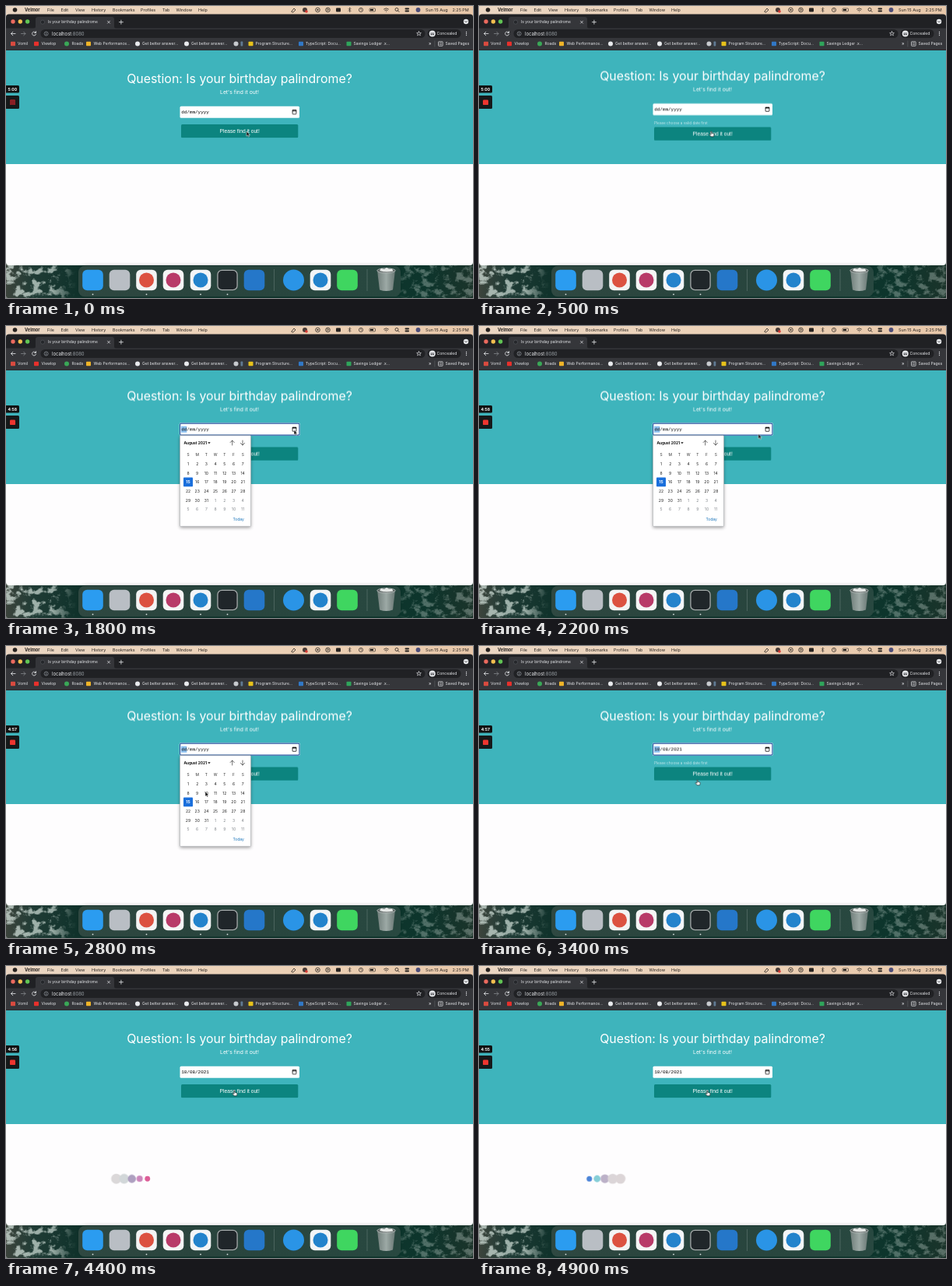
An HTML page that plays this animation: 600 by 375 pixels, repeating every 5000 ms.

```html
<!DOCTYPE html>
<html lang="en">
<head>
<meta charset="utf-8">
<title>Is your birthday palindrome</title>
<style>
html, body { margin: 0; width: 100%; height: 100%; overflow: hidden; background: #123a37; }
svg { display: block; width: 100vw; height: 100vh; }
text { font-family: Inter, sans-serif; white-space: pre; }
.mono { font-family: "Liberation Mono", monospace; font-size: 5.95px; }
.arial { font-family: "Liberation Sans", Arial, sans-serif; }
.b { font-weight: 700; }
.mid { text-anchor: middle; }

.step { animation: 5s step-end infinite; }
.head { animation-name: head; }
.button { animation-name: button; }
.error { animation-name: error; }
.picker { animation-name: picker; }
.focus { animation-name: focus; }
.empty { animation-name: empty; }
.filled { animation-name: filled; }
.loader { animation-name: loader; }
.clock { animation-name: clock; }
.dim { animation-name: dim; }
.arrow { animation-name: arrow; }
.hand { animation-name: hand; }
.cursor { animation: move 5s linear infinite; }
.dot { fill: var(--c); transform-box: fill-box; transform-origin: center; animation: pulse 5s ease-in-out infinite; }

@keyframes head { 0%, 75% { transform: translateY(3.5px); } 6% { transform: none; } }
@keyframes button { 0%, 75% { transform: translateY(-3.5px); } 6% { transform: none; } }
@keyframes error { 0%, 75% { opacity: 0; } 6% { opacity: 1; } }
@keyframes picker { 0%, 58% { opacity: 0; } 30% { opacity: 1; } }
@keyframes focus { 0%, 75% { opacity: 0; } 30% { opacity: 1; } }
@keyframes empty { 0% { opacity: 1; } 58% { opacity: 0; } }
@keyframes filled { 0% { opacity: 0; } 58% { opacity: 1; } }
@keyframes loader { 0% { opacity: 0; } 75% { opacity: 1; } }
@keyframes dim { 0% { opacity: 1; } 2% { opacity: 0; } }
@keyframes arrow { 0%, 14% { opacity: 1; } 2%, 67% { opacity: 0; } }
@keyframes hand { 0%, 14% { opacity: 0; } 2%, 67% { opacity: 1; } }
@keyframes clock {
  0% { transform: none; }
  14% { transform: translateY(-12px); }
  34% { transform: translateY(-24px); }
  54% { transform: translateY(-36px); }
  74% { transform: translateY(-48px); }
  94% { transform: translateY(-60px); }
}
@keyframes move {
  0%, 2% { transform: translate(309px, 161px); }
  8%, 12% { transform: translate(298.5px, 161px); }
  17% { transform: translate(326px, 150px); }
  24%, 38% { transform: translate(370px, 133.5px); }
  44% { transform: translate(359px, 138.5px); }
  54%, 59% { transform: translate(256px, 187px); }
  63% { transform: translate(268px, 180px); }
  68% { transform: translate(280.5px, 172px); }
  72%, 100% { transform: translate(293.5px, 160px); }
}
@keyframes pulse {
  0%, 75%, 100% { transform: scale(1); fill: var(--c); }
  87.5% { transform: scale(1.95); fill: #dcd8d9; }
}
</style>
</head>
<body>
<svg id="stage" viewBox="0 0 600 375" preserveAspectRatio="none"></svg>
<script>
const rect = (x, y, w, h, fill, r = 0, extra = '') =>
  `<rect x="${x}" y="${y}" width="${w}" height="${h}" rx="${r}" fill="${fill}" ${extra}/>`;
const circle = (x, y, r, fill, extra = '') =>
  `<circle cx="${x}" cy="${y}" r="${r}" fill="${fill}" ${extra}/>`;
const line = (d, color, w = 0.8) =>
  `<path d="${d}" fill="none" stroke="${color}" stroke-width="${w}" stroke-linecap="round" stroke-linejoin="round"/>`;
// y is the middle of the capitals
const text = (x, y, str, size, fill, cls = '') =>
  `<text x="${x}" y="${y + size * 0.36}" font-size="${size}" fill="${fill}" class="${cls}">${str}</text>`;
const group = (cls, ...parts) => `<g class="${cls}">${parts.join('')}</g>`;

const defs = `<defs>
  <linearGradient id="sky"><stop offset="0" stop-color="#ead6c3"/><stop offset=".5" stop-color="#ecd2b8"/>
    <stop offset="1" stop-color="#e8c8aa"/></linearGradient>
  <linearGradient id="sea"><stop offset="0" stop-color="#3c443c"/><stop offset=".06" stop-color="#1f3b35"/>
    <stop offset=".15" stop-color="#10322b"/><stop offset=".9" stop-color="#0d352c"/><stop offset="1" stop-color="#1b332a"/></linearGradient>
  <linearGradient id="shelf"><stop offset="0" stop-color="#2f4841"/><stop offset=".4" stop-color="#29443d"/>
    <stop offset="1" stop-color="#284840"/></linearGradient>
  <linearGradient id="fade"><stop offset="0" stop-color="#bbb"/><stop offset=".1" stop-color="#aaa"/>
    <stop offset=".15" stop-color="#000"/><stop offset=".82" stop-color="#000"/><stop offset=".87" stop-color="#555"/>
    <stop offset="1" stop-color="#555"/></linearGradient>
  <linearGradient id="can"><stop offset="0" stop-color="#89918f"/><stop offset=".5" stop-color="#c3c9c7"/>
    <stop offset="1" stop-color="#7f8886"/></linearGradient>
  <mask id="shore"><rect y="330" width="600" height="45" fill="url(#fade)"/></mask>
  <filter id="foam" x="0" y="0" width="1" height="1">
    <feTurbulence type="fractalNoise" baseFrequency=".09 .11" numOctaves="5" seed="8"/>
    <feColorMatrix values="0 0 0 0 .68  0 0 0 0 .78  0 0 0 0 .73  6 0 0 0 -3"/>
  </filter>
  <filter id="soft" x="-.2" y="-.2" width="1.4" height="1.4"><feGaussianBlur stdDeviation="2"/></filter>
  <clipPath id="face"><rect y="102" width="17" height="9.5"/></clipPath>
</defs>`;

function desktop() {
  return rect(0, 0, 600, 375, 'url(#sea)') +
    `<g mask="url(#shore)">${rect(0, 330, 600, 45, '#fff', 0, 'filter="url(#foam)"')}</g>` +
    rect(0, 0, 600, 14, 'url(#sky)');
}

function menuBar() {
  const ink = '#27221f';
  const items = [[53, 'File'], [70.5, 'Edit'], [89, 'View'], [110, 'History'], [137, 'Bookmarks'],
    [173, 'Profiles'], [201, 'Tab'], [218.5, 'Window'], [247, 'Help']];
  return circle(11.5, 5, 2.8, ink) + text(24, 5, 'Velmor', 5.6, ink, 'b') +
    items.map(([x, s]) => text(x, 5, s, 5.4, ink)).join('') +
    line('M367 7l3-4 2 2-3 3z', ink) +
    circle(384, 5, 3, '#493c38') + circle(386, 7, 1.8, '#d93b35') +
    circle(400.5, 5, 2.8, 'none', `stroke="${ink}" stroke-width=".8"`) + circle(400.5, 5, 1.1, ink) +
    circle(413.5, 5, 2.8, 'none', `stroke="${ink}" stroke-width=".8"`) + line('M412.8 3.8v2.4l2-1.2z', ink, .6) +
    rect(424, 2.5, 6, 5, ink, 1) +
    line('M440 3.4l3 3-1.5 1.5v-6l1.5 1.5-3 3', ink, .6) +
    circle(456, 5, 2.6, 'none', `stroke="${ink}" stroke-width=".7"`) + line('M456 3.5V5l1 .7', ink, .6) +
    rect(467, 3, 7.5, 4, 'none', 1, `stroke="${ink}" stroke-width=".6"`) + rect(468, 4, 4, 2, ink) +
    line('M485.5 4q3-2.5 6 0M486.8 5.6q1.7-1.4 3.4 0M488.5 7.2h.1', ink, .8) +
    circle(502, 4.5, 2, 'none', `stroke="${ink}" stroke-width=".8"`) + line('M503.5 6l1.6 1.6', ink) +
    rect(512.5, 2.5, 5.5, 2, ink, 1) + rect(512.5, 5.5, 5.5, 2, ink, 1) +
    circle(529.5, 5, 2.9, '#4d4d78') +
    text(539, 5, 'Sun 15 Aug', 5.4, ink) + text(573.5, 5, '2:25 PM', 5.4, ink);
}

function browser() {
  const pale = '#e8eaed', grey = '#9aa0a6';
  const lights = ['#ec6a5e', '#f4bf4f', '#61c554'];
  const marks = [
    [9, '#d94a3f', 15, 'Vomil'], [39, '#e8302c', 45.5, 'Viewlop'], [78, '#3aa757', 84.5, 'Roads'],
    [106, '#f0b429', 112.5, 'Web Performance...'], [169, '#e8eaed', 175, 'Get better answer...'],
    [232, '#e8eaed', 238, 'Get better answer...'], [295.5, '#c7cace', 301, ''],
    [314.5, '#e8c21a', 320.5, 'Program Structure...'], [379, '#3178c6', 385, 'TypeScript: Docu...'],
    [440.5, '#2fa55b', 446.5, 'Savings Ledger .x...']];
  const round = new Set([78, 169, 232, 295.5]);
  return `<path d="M0 60V14q0-3.5 4-3.5H596q4 0 4 3.5V60z" fill="#202124"/>` +
    lights.map((c, i) => circle(9 + i * 9.3, 20, 2.7, c)).join('') +
    `<path d="M35 29q3 0 3-3V17q0-3 3-3h95q3 0 3 3v9q0 3 3 3z" fill="#35363a"/>` +
    circle(47, 20.7, 2.6, '#24262a', 'stroke="#5a5d62" stroke-width=".6"') +
    text(54, 20.7, 'Is your birthday palindrome', 4.95, pale) +
    line('M130.5 19.2l3 3m0-3l-3 3', pale, .7) + line('M145.4 20.7h5m-2.5-2.5v5', pale, .8) +
    circle(591, 20, 3.2, pale) + line('M589.5 19.4l1.5 1.5 1.5-1.5', '#35363a', .8) +
    rect(0, 28.5, 600, 28.5, '#35363a') +
    line('M12 35.5H6.5m2.3-2.3l-2.3 2.3 2.3 2.3', pale) + line('M19.5 35.5H25m-2.3-2.3l2.3 2.3-2.3 2.3', '#85888c') +
    line('M38.3 34.3a2.5 2.5 0 1 0 .2 2M38.5 32.6v1.9h-1.9', pale) +
    rect(44.5, 30, 494, 11, '#202124', 5.5) +
    circle(51.6, 35.5, 2.5, 'none', `stroke="${grey}" stroke-width=".7"`) + line('M51.6 35.4v1.3m0-2.6v.1', grey, .7) +
    text(59, 35.5, `localhost<tspan fill="${grey}">:8080</tspan>`, 5.9, pale) +
    line('M530.5 32.6l.9 2h2l-1.6 1.3.6 2-1.9-1.2-1.9 1.2.6-2-1.6-1.3h2z', pale, .6) +
    rect(541.5, 30, 43, 11, '#202124', 5.5) + circle(547.7, 35.5, 4, pale) +
    rect(545.3, 34.6, 4.8, .8, '#35363a') + circle(546.5, 36.6, .9, '#35363a') + circle(548.9, 36.6, .9, '#35363a') +
    text(553.5, 35.5, 'Concealed', 5.1, pale) +
    [33.4, 35.5, 37.6].map(y => circle(591.5, y, .65, pale)).join('') +
    marks.map(([x, c, tx, s]) =>
      (round.has(x) ? circle(x, 48.5, 3, c) : rect(x - 3, 45.7, 6, 5.6, c, .8)) +
      text(tx, 48.5, s, 5, pale)).join('') +
    rect(301.5, 45.5, 2.8, 6, '#617b94', .8) +
    text(543, 48.2, '»', 6, pale) + rect(550.6, 44.5, .6, 8, '#5f6368') +
    rect(555.5, 45.7, 5.6, 5.6, 'none', .7, `stroke="${pale}" stroke-width=".7"`) +
    line('M557 47.5h2.6m-2.6 2h2.6', pale, .6) + text(564.5, 48.5, 'Saved Pages', 5, pale) +
    rect(0, 56.3, 600, .7, '#26272a') +
    '<path d="M0 200H600V329q0 4-4 4H4q-4 0-4-4z" fill="#fefdfe"/>' +
    rect(0, 57, 600, 146, '#3eb4bc');
}

function page() {
  const colors = ['#4480d8', '#5ac9d6', '#67489a', '#c871b4', '#dd5c96'];
  const field = rect(223.5, 125.2, 153.5, 15, '#fff', 1.5) +
    group('step focus',
      rect(222.8, 124.3, 154.9, 16.6, '#fff', 2) +
      rect(223.6, 125.1, 153.3, 15, '#fff', 1.3, 'stroke="#1b4f9c" stroke-width="1.1"') +
      rect(225, 128.6, 7.3, 8.2, '#8fc3f2')) +
    group('step empty', text(225.2, 132.6, 'dd/mm/yyyy', 5.95, '#000', 'mono')) +
    group('step filled', text(225.2, 132.6, '10/08/2021', 5.95, '#000', 'mono')) +
    rect(368.1, 130.4, 4.8, 4.9, 'none', .5, 'stroke="#111" stroke-width=".8"') +
    rect(367.8, 129.7, 5.4, 1.9, '#111', .3);
  return group('step head',
      text(300, 90.2, 'Question: Is your birthday palindrome?', 15.9, '#fff', 'mid'),
      text(300, 106.8, "Let's find it out!", 6.8, '#fff', 'mid'), field) +
    group('step error', `<g font-weight="300">${text(225, 150, 'Please choose a valid date first', 4.78, '#e0f3f4')}</g>`) +
    group('step button', rect(225, 155.4, 150.3, 17.4, '#0c847f', 1.5),
      text(300.2, 164, 'Please find it out!', 6.7, '#fff', 'mid arial')) +
    group('step loader', ...colors.map((c, i) =>
      circle(141.7 + i * 10, 273.2, 3.35, c, `class="dot" style="--c:${c};animation-delay:${i * 150}ms"`)));
}

function picker() {
  const col = i => 234 + i * 11.7;
  let cells = '';
  for (let i = 0; i < 42; i++) {
    const day = i % 31 + 1, now = i === 14;
    const fill = now ? '#fff' : i > 30 ? '#80868b' : '#222';
    cells += text(col(i % 7), 177.2 + (i / 7 | 0) * 11.65, day, 5.1, fill, now ? 'mid b' : 'mid');
  }
  return group('step picker',
    rect(223.5, 142, 91, 117, '#000', 1, 'opacity=".4" filter="url(#soft)"'),
    rect(223.5, 140.7, 91, 116.6, '#fff', 1, 'stroke="#a9adb0" stroke-width=".6"'),
    text(228.5, 150, 'August 2021', 4.8, '#111', 'b'),
    '<path d="M259.3 149.2h3.4l-1.7 2z" fill="#111"/>',
    line('M290.7 153v-6m-2.6 2.6l2.6-2.6 2.6 2.6', '#333', .7),
    line('M304 147v6m-2.6-2.6l2.6 2.6 2.6-2.6', '#333', .7),
    ...[...'SMTWTFS'].map((s, i) => text(col(i), 165.3, s, 4.9, '#333', 'mid')),
    rect(228, 194.5, 12, 11.7, '#1a6fdc', .8), cells,
    text(298.7, 248.3, 'Today', 5, '#1471b8', 'mid'));
}

function recorder() {
  const times = ['5:00', '4:59', '4:58', '4:57', '4:56', '4:55'];
  return rect(-3, 102, 20, 9.5, '#111', 1.5) +
    `<g clip-path="url(#face)">${group('step clock', ...times.map((s, i) => text(8.3, 107 + i * 12, s, 5.1, '#fff', 'mid b')))}</g>` +
    rect(-3, 115, 20, 17, '#16191a', 1.5) + rect(5, 120.5, 7, 6.6, '#ee352f', 1.2) +
    group('step dim', rect(5, 120.5, 7, 6.6, '#8a1f25', 1.2));
}

function dock() {
  // x, tile colour, mark colour, running
  const apps = [[111.5, '#2b9cf0', '', 1], [146, '#b9bec4'], [180.5, '#f3f3f3', '#dc5140', 1],
    [215, '#f5f5f5', '#b83a68'], [250, '#f3f5f7', '#2383cc', 1], [284.5, '#20262a', '', 1], [319, '#2577c9'],
    [369.5, '', '#2a94e6'], [404, '#f3f5f7', '#2383cc'], [438.5, '#3fd660']];
  return rect(95, 333, 410, 38, '#000', 8, 'opacity=".25" filter="url(#soft)"') +
    rect(93, 333.8, 414, 39.5, 'url(#shelf)', 8) +
    apps.map(([x, tile, mark, on]) =>
      (tile ? rect(x - 13.3, 338.7, 26.6, 26.6, tile, 6) : '') +
      (mark ? circle(x, 352, tile ? 9.5 : 13.5, mark) : '') +
      (on ? circle(x, 370.3, .9, '#dfe7e6') : '')).join('') +
    rect(271.9, 339.4, 25.2, 25.2, 'none', 5.4, 'stroke="#a7adad" stroke-width="1.3"') +
    rect(344.3, 338, .6, 28, '#647a74') + rect(463.7, 338, .6, 28, '#647a74') +
    '<path d="M477 339.5h23l-3 25q-8.5 3-17 0z" fill="url(#can)" opacity=".75"/>' +
    '<ellipse cx="488.5" cy="339.8" rx="11.8" ry="3" fill="#59615f" stroke="#c9d0ce" stroke-width=".7"/>' +
    '<path d="M480 340l2-3.2 4 1.2 3-2 3 1.7 4-.3 1.5 3q-9 2.4-17.5-.4z" fill="#e5e8e6"/>';
}

const cursor = group('cursor',
  group('step arrow', '<path d="M0 0v6.2l1.5-1.3 1 2.2 1.1-.5-1-2.1h2z" fill="#111" stroke="#fff" stroke-width=".5"/>'),
  group('step hand', '<path d="M-.6 .1q.7-.7 1.2.2v2.1l2.3.6q.8.3.6 1.2l-.6 2.6h-3.3l-2-2.6q-.2-.9.8-.6l1 .7z" fill="#fff" stroke="#111" stroke-width=".6"/>'));

document.getElementById('stage').innerHTML =
  defs + desktop() + menuBar() + browser() + page() + picker() + recorder() + dock() + cursor;
</script>
</body>
</html>
```
